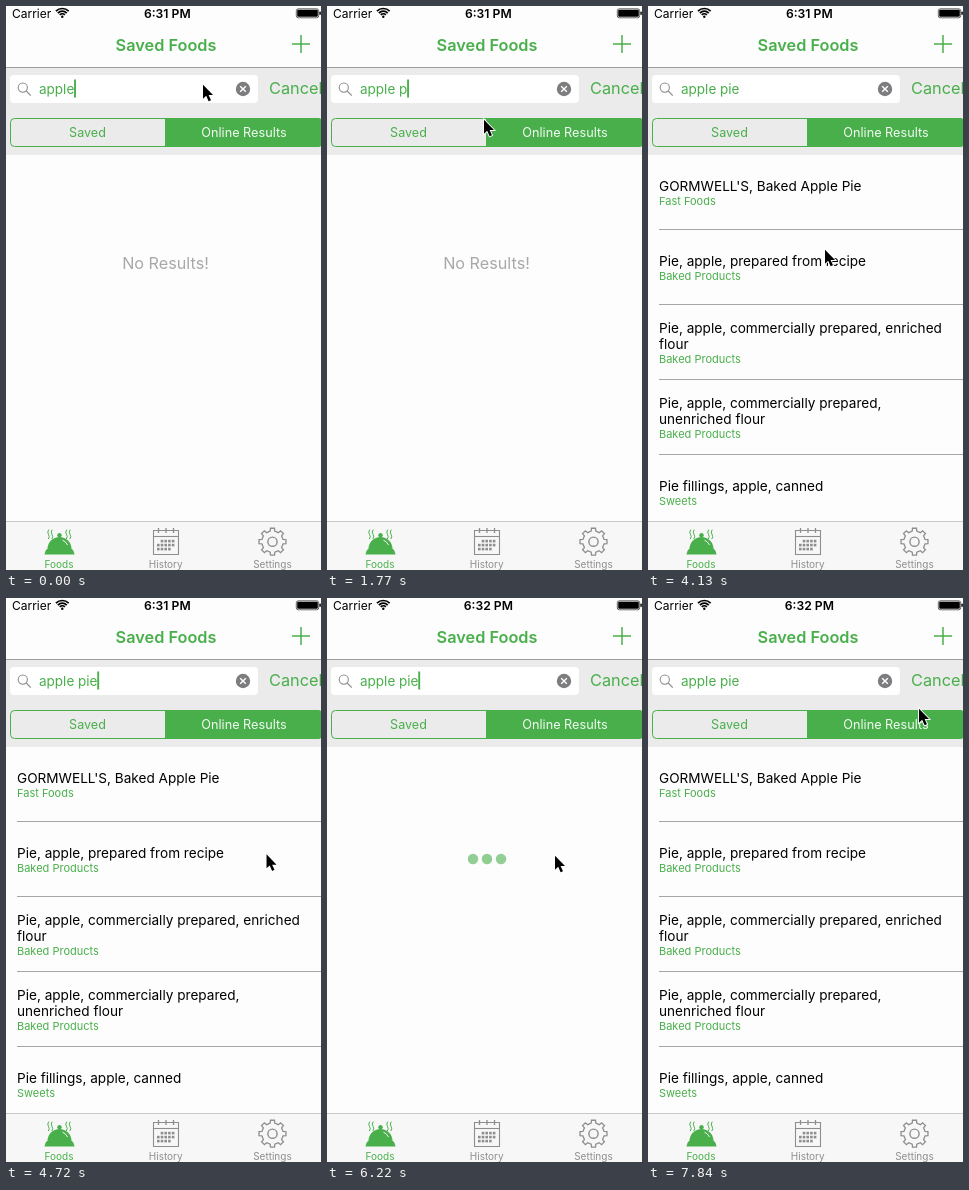
An HTML page with a canvas for the animation above (7.99 s loop, 315x564 px).

```html
<!DOCTYPE html>
<html lang="en">
<head>
<meta charset="utf-8">
<title>Saved Foods</title>
<style>
html, body { margin: 0; width: 100%; height: 100%; overflow: hidden; background: #fdfdfd; }
canvas { display: block; width: 315px; height: 564px; }
</style>
</head>
<body>
<canvas id="stage"></canvas>
<script>
const W = 315, H = 564, LOOP = 7990, TICK = 148, LAST_TICK = 53;
const GREEN = '#49af4b', GRAY = '#8e8e8e', PAPER = '#fdfdfd', BAR = '#ebebeb', TABS = '#f7f7f7';
const ROW = 75, ACTION = 84;

const canvas = document.getElementById('stage');
const ctx = canvas.getContext('2d');
const ratio = window.devicePixelRatio || 1;
canvas.width = W * ratio;
canvas.height = H * ratio;

// All times are in ticks: the screen refreshes once per tick.
const QUERY = 'apple pie';
const KEYSTROKES = [-3, 11, 12, 15, 22];
const LOADING = [[15, 17], [22, 26], [40, 44]];
const LIST_START = 26, CLOCK_CHANGE = 41;
const SWIPE = { from: 32, to: 36, closed: 40 };

const POINTER_START = [197, 78];
const MOVES = [
  { from: 1, to: 3, x: 217, y: 190 },
  { from: 3, to: 6, x: 157, y: 113 },
  { from: 25, to: 28, x: 177, y: 243 },
  { from: 28, to: 32, x: 276, y: 258 },
  { from: 32, to: 36, x: 174, y: 257 },
  { from: 37, to: 39, x: 262, y: 258 },
  { from: 39, to: 42, x: 228, y: 257 },
  { from: 45, to: 47, x: 273, y: 93 },
  { from: 48, to: 49, x: 278, y: 71 },
  { from: 51, to: 53, x: 271, y: 110 }
];

const FOODS = [
  { group: 'Fast Foods', lines: ["GORMWELL'S, Baked Apple Pie"] },
  { group: 'Baked Products', lines: ['Pie, apple, prepared from recipe'] },
  { group: 'Baked Products', lines: ['Pie, apple, commercially prepared, enriched', 'flour'] },
  { group: 'Baked Products', lines: ['Pie, apple, commercially prepared,', 'unenriched flour'] },
  { group: 'Sweets', lines: ['Pie fillings, apple, canned'] }
];

function ease(tick, from, to) {
  const u = Math.min(1, Math.max(0, (tick - from) / (to - from)));
  return u * u * (3 - 2 * u);
}

function pointerAt(tick) {
  let [x, y] = POINTER_START;
  for (const move of MOVES) {
    const u = ease(tick, move.from, move.to);
    x += (move.x - x) * u;
    y += (move.y - y) * u;
  }
  return [x, y];
}

function swipeAt(tick) {
  return tick < SWIPE.closed ? 2 * ACTION * ease(tick, SWIPE.from, SWIPE.to) : 0;
}

// The caret stays lit after a keystroke, then blinks every six ticks.
function caretAlpha(idle) {
  const phase = (idle + 1) % 6;
  if (idle < 5 || phase > 2) return 1;
  return phase === 0 ? .5 : 0;
}

function text(str, x, y, size, color, align = 'left', weight = 400) {
  ctx.font = `${weight} ${size}px Inter, sans-serif`;
  ctx.textAlign = align;
  ctx.fillStyle = color;
  ctx.fillText(str, x, y);
}

function box(x, y, w, h, color) {
  ctx.fillStyle = color;
  ctx.fillRect(x, y, w, h);
}

function rounded(x, y, w, h, r, color) {
  ctx.fillStyle = color;
  ctx.beginPath();
  ctx.roundRect(x, y, w, h, r);
  ctx.fill();
}

function outline(x, y, w, h, r, color, width = 1) {
  ctx.strokeStyle = color;
  ctx.lineWidth = width;
  ctx.beginPath();
  ctx.roundRect(x, y, w, h, r);
  ctx.stroke();
}

function disc(x, y, r, color) {
  ctx.fillStyle = color;
  ctx.beginPath();
  ctx.arc(x, y, r, 0, Math.PI * 2);
  ctx.fill();
}

function arc(x, y, r, color, width, from = 0, to = Math.PI * 2) {
  ctx.strokeStyle = color;
  ctx.lineWidth = width;
  ctx.lineCap = 'butt';
  ctx.beginPath();
  ctx.arc(x, y, r, from, to);
  ctx.stroke();
}

function stroke(path, color, width, cap = 'butt') {
  ctx.strokeStyle = color;
  ctx.lineWidth = width;
  ctx.lineCap = cap;
  ctx.stroke(new Path2D(path));
}

function fill(path, color) {
  ctx.fillStyle = color;
  ctx.fill(new Path2D(path));
}

function at(x, y, angle, draw) {
  ctx.save();
  ctx.translate(x, y);
  ctx.rotate(angle);
  draw();
  ctx.restore();
}

function drawStatus(tick) {
  text('Carrier', 6, 12, 12, '#000');
  for (let i = 0; i < 3; i++) {
    arc(56.3, 11.5, 3.6 + 2.7 * i, '#000', 1.7, -Math.PI * .75, -Math.PI * .25);
  }
  disc(56.3, 10.7, 1.2, '#000');
  text(tick < CLOCK_CHANGE ? '6:31 PM' : '6:32 PM', 161.3, 12, 12.2, '#000', 'center', 600);
  outline(290.3, 2.8, 22.4, 9, 2, '#000', .6);
  rounded(291.2, 3.8, 20.6, 7, 1, '#000');
  rounded(313.4, 5.6, 1.4, 3.4, .7, '#000');
}

function drawSearch(tick) {
  rounded(4, 69, 248, 28, 4, '#fff');
  arc(16.8, 81.6, 4.6, GRAY, 1.1);
  stroke('M20.2 85L24.8 89.6', GRAY, 1.2);

  const typed = KEYSTROKES.filter(key => key <= tick);
  const query = QUERY.slice(0, 4 + typed.length);
  text(query, 33, 87.5, 13.5, GREEN);
  const end = 33 + ctx.measureText(query).width;
  ctx.globalAlpha = caretAlpha(tick - typed[typed.length - 1]);
  box(end - .2, 73.5, 1.9, 18, GREEN);
  ctx.globalAlpha = 1;

  disc(237, 83, 7.2, '#7d7d80');
  stroke('M234.2 80.2L239.8 85.8M239.8 80.2L234.2 85.8', '#fff', 1.4);
  text('Cancel', 263, 88.3, 16.3, GREEN);
}

function drawHeader(tick) {
  drawStatus(tick);
  text('Saved Foods', 160, 45, 16.3, GREEN, 'center', 600);
  stroke('M286 38H304M295 29V47', GREEN, 1.5);
  box(0, 61, W, 88, BAR);
  box(0, 61, W, 1, '#9a9f9a');
  drawSearch(tick);
  rounded(159, 112, 157, 29, [0, 4, 4, 0], GREEN);
  outline(4.5, 112.5, 311, 28, 4, GREEN);
  text('Saved', 81.5, 131, 12.6, GREEN, 'center');
  text('Online Results', 238, 131, 12.7, '#f2faf2', 'center');
}

function drawLoader(tick) {
  for (let i = 0; i < 3; i++) {
    const phase = (tick * TICK - 3236) / 700 + 10 + (i === 1 ? .5 : 0);
    const dip = 1 - Math.abs(2 * (phase % 1) - 1);
    ctx.globalAlpha = 1 - .8 * dip;
    disc(146 + 14 * i, 261, 6 * (1 - .25 * dip), GREEN);
  }
  ctx.globalAlpha = 1;
}

function drawFood(food, row, shift) {
  const x = 11 - shift, count = food.lines.length;
  const y = 185 + ROW * row - 8 * (count - 1);
  food.lines.forEach((line, i) => text(line, x, y + 16 * i, 13.6, '#000'));
  text(food.group, x, y + 16 * count - 2, 11, GREEN);
}

function drawActions(shift) {
  const x = 324 - shift, top = 149 + ROW, y = top + 38, dark = '#404040';
  box(x, top, ACTION, ROW, dark);
  box(x + ACTION, top, ACTION, ROW, GREEN);
  at(x + 42, y, 0, () => {
    disc(0, 0, 17.5, '#fff');
    stroke('M0 -18V9M-9 0L0 9.5L9 0', dark, 4.6);
  });
  at(x + 42 + ACTION, y, Math.PI / 4, () => {
    disc(0, 0, 17.5, '#fff');
    stroke('M0 0V15.5', GREEN, 4.2, 'round');
    fill('M-6 -6H6V-2Q6 4 0 4Q-6 4 -6 -2Z', GREEN);
    stroke('M-4.8 -13V-5M0 -13V-5M4.8 -13V-5', GREEN, 2.4, 'round');
  });
}

function drawList(tick) {
  const shift = swipeAt(tick);
  FOODS.forEach((food, row) => {
    drawFood(food, row, row === 1 ? shift : 0);
    box(11, 223 + ROW * row, W - 11, 1, '#a6a6a6');
  });
  if (shift > 0) drawActions(shift);
}

function drawCloche() {
  fill('M41.5 543A12 12 0 0 1 65.5 543Z', GREEN);
  disc(53.5, 529.3, 2.2, GREEN);
  fill('M41 543H66Q68.5 545 68.5 548.5H38.5Q38.5 545 41 543Z', GREEN);
  stroke('M56.5 534.2Q60 535.6 61.5 539', TABS, 1);
  for (const x of [42.5, 46, 60.5, 64]) {
    stroke(`M${x} 524q-1.6 2.2 0 4.4t0 4.4`, GREEN, 1, 'round');
  }
}

function drawCalendar() {
  outline(147.5, 524.5, 25, 24, 0, GRAY, 1.1);
  stroke('M147.5 530.5H172.5', GRAY, 1.1);
  stroke('M152.5 522V527M160 522V527M167.5 522V527', GRAY, 1.3);
  for (let day = 1; day < 14; day++) {
    box(151 + 3.7 * (day % 5), 533.8 + 4 * Math.floor(day / 5), 2.6, 2.6, GRAY);
  }
}

function drawGear() {
  const step = Math.PI / 4;
  ctx.beginPath();
  for (let tooth = 0; tooth < 8; tooth++) {
    for (const [offset, r] of [[-.27, 10.8], [-.19, 13.6], [.19, 13.6], [.27, 10.8]]) {
      const angle = (tooth + offset) * step;
      ctx.lineTo(266.5 + r * Math.cos(angle), 535.7 + r * Math.sin(angle));
    }
  }
  ctx.closePath();
  ctx.strokeStyle = GRAY;
  ctx.lineWidth = 1.3;
  ctx.stroke();
  arc(266.5, 535.7, 4.6, GRAY, 1.4);
}

function drawTabs() {
  box(0, 515, W, 49, TABS);
  box(0, 515, W, 1, '#c9c9c9');
  drawCloche();
  drawCalendar();
  drawGear();
  ['Foods', 'History', 'Settings'].forEach((label, i) => {
    text(label, 53 + 106.7 * i, 561.5, 10, i ? GRAY : GREEN, 'center');
  });
}

function drawPointer(tick) {
  const [x, y] = pointerAt(tick);
  const arrow = 'M0 0V14L3.2 11.1L5.6 16.6L8 15.5L5.6 10.3H10Z';
  at(x, y + .7, 0, () => {
    stroke(arrow, '#fff', 1.8);
    fill(arrow, '#000');
  });
}

function draw(time) {
  const tick = Math.min(LAST_TICK, Math.floor((time % LOOP + 14) / TICK));
  ctx.setTransform(ratio, 0, 0, ratio, 0, 0);
  box(0, 0, W, H, PAPER);
  if (LOADING.some(([from, to]) => tick >= from && tick < to)) drawLoader(tick);
  else if (tick >= LIST_START) drawList(tick);
  else text('No Results!', 159.5, 262.5, 16.2, '#a8a8a8', 'center');
  drawHeader(tick);
  drawTabs();
  drawPointer(tick);
}

const start = performance.now();
function frame() {
  draw(performance.now() - start);
  requestAnimationFrame(frame);
}
frame();
</script>
</body>
</html>
```
